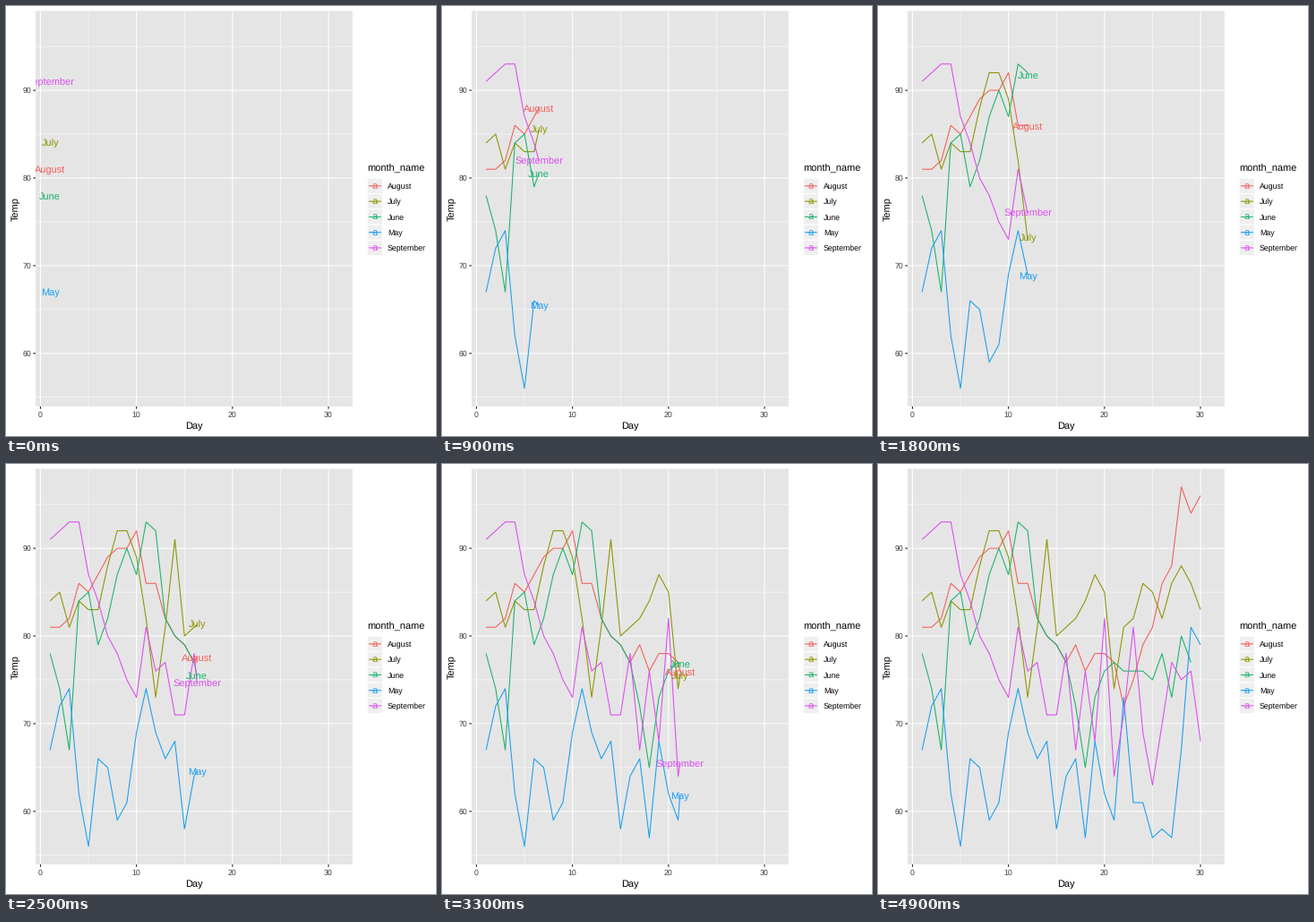
A matplotlib script for the animation above (5 s loop, 480 by 480 pixels).

```python
import matplotlib.pyplot as plt
from matplotlib.animation import FuncAnimation
from matplotlib.patches import Rectangle

SIZE, DPI = 480, 72
FRAMES, INTERVAL = 50, 100
LEFT, RIGHT, TOP, BOTTOM = 33.1, 386.8, 5.5, 447.0
X_MIN, X_MAX, Y_MIN, Y_MAX = -0.5, 32.5, 53.95, 99.05
LINE = 1.07

# Daily temperatures from the airquality data set
august = [81, 81, 82, 86, 85, 87, 89, 90, 90, 92, 86, 86, 82, 80, 79, 77,
          79, 76, 78, 78, 77, 72, 75, 79, 81, 86, 88, 97, 94, 96, 94]
july = [84, 85, 81, 84, 83, 83, 88, 92, 92, 89, 82, 73, 81, 91, 80, 81,
        82, 84, 87, 85, 74, 81, 82, 86, 85, 82, 86, 88, 86, 83, 81]
june = [78, 74, 67, 84, 85, 79, 82, 87, 90, 87, 93, 92, 82, 80, 79, 77,
        72, 65, 73, 76, 77, 76, 76, 76, 75, 78, 73, 80, 77, 83]
may = [67, 72, 74, 62, 56, 66, 65, 59, 61, 69, 74, 69, 66, 68, 58, 64,
       66, 57, 68, 62, 59, 73, 61, 61, 57, 58, 57, 67, 81, 79, 76]
september = [91, 92, 93, 93, 87, 84, 80, 78, 75, 73, 81, 76, 77, 71, 71, 78,
             67, 76, 68, 82, 64, 71, 81, 69, 63, 70, 77, 75, 76, 68]

NAMES = ["August", "July", "June", "May", "September"]
COLORS = ["#F35E5A", "#8E9400", "#19B56B", "#189FF2", "#DD4DF0"]
TEMPS = [august, july, june, may, september]

plt.rcParams.update({
    "font.family": "Liberation Sans",
    "text.hinting": "none",
    "toolbar": "None",
    "lines.solid_capstyle": "butt",
    "lines.solid_joinstyle": "round",
    "path.simplify": False,
})

fig = plt.figure(figsize=(SIZE / DPI, SIZE / DPI), dpi=DPI, facecolor="white")
ax = fig.add_axes([0, 0, 1, 1])
ax.set_xlim(0, SIZE)
ax.set_ylim(SIZE, 0)
ax.axis("off")


def px(day):
    return LEFT + (day - X_MIN) / (X_MAX - X_MIN) * (RIGHT - LEFT)


def py(temp):
    return BOTTOM - (temp - Y_MIN) / (Y_MAX - Y_MIN) * (BOTTOM - TOP)


def stroke(xs, ys, color, width=LINE, z=2):
    return ax.plot(xs, ys, color=color, lw=width, snap=False, zorder=z)[0]


def write(x, y, text, size, color="black", ha="left", z=5, **kw):
    """Text whose capitals are centred vertically on y."""
    return ax.text(x, y + 0.36 * size, text, fontsize=size, color=color,
                   ha=ha, va="baseline", zorder=z, **kw)


def box(x, y, w, h, fill, edge="none"):
    return ax.add_patch(Rectangle((x, y), w, h, fc=fill, ec=edge, lw=LINE,
                                  snap=False, zorder=1))


def draw_panel():
    panel = box(LEFT, TOP, RIGHT - LEFT, BOTTOM - TOP, "#E5E5E5")
    for day in range(0, 31, 5):
        major = day % 10 == 0
        stroke([px(day)] * 2, [TOP, BOTTOM], "white", LINE if major else LINE / 2)
        if major:
            stroke([px(day)] * 2, [BOTTOM, BOTTOM + 2.75], "#222222")
            write(px(day), 456, str(day), 8.8, "#3C3C3C", "center")
    for temp in range(55, 100, 5):
        major = temp % 10 == 0
        stroke([LEFT, RIGHT], [py(temp)] * 2, "white", LINE if major else LINE / 2)
        if major:
            stroke([LEFT - 2.75, LEFT], [py(temp)] * 2, "#222222")
            write(LEFT - 4.95, py(temp), str(temp), 8.8, "#3C3C3C", "right")
    write((LEFT + RIGHT) / 2, 468.1, "Day", 11, ha="center")
    ax.text(13.5, (TOP + BOTTOM) / 2, "Temp", fontsize=11, rotation=90,
            rotation_mode="anchor", ha="center", va="baseline")
    return panel


def draw_legend():
    x, y, key = 403.2, 192.2, 17.28
    write(x, 180.8, "month_name", 11)
    for i, (name, color) in enumerate(zip(NAMES, COLORS)):
        top = y + i * key
        mid = top + key / 2
        box(x, top, key, key, "#EFEFEF", "white")
        stroke([x + 0.1 * key, x + 0.9 * key], [mid, mid], color)
        write(x + key / 2, mid, "a", 11, color, "center")
        write(x + key + 5.5, mid, name, 8.8)


panel = draw_panel()
draw_legend()
paths = [stroke([], [], c, z=3) for c in COLORS]
labels = [write(0, 0, n, 11, c, "center", 4, clip_on=True)
          for n, c in zip(NAMES, COLORS)]
for artist in paths + labels:
    artist.set_clip_path(panel)


def update(frame):
    now = 1 + 30 * frame / (FRAMES - 1)
    for name, temps, path, label in zip(NAMES, TEMPS, paths, labels):
        running = now < len(temps)
        label.set_visible(running)
        if running:
            whole = int(now)
            a, b = temps[whole - 1:whole + 1]
            temp = a + (b - a) * (now - whole)
            days = list(range(1, whole + 1)) + [now]
            shown = temps[:whole] + [temp]
            label.set_position((px(now), py(temp) + 0.36 * 11))
        else:
            # A finished series loses its last day, except the final month
            shown = temps if name == "September" else temps[:-1]
            days = range(1, len(shown) + 1)
        path.set_data([px(d) for d in days], [py(t) for t in shown])
    return paths + labels


anim = FuncAnimation(fig, update, frames=FRAMES, interval=INTERVAL,
                     repeat=True, repeat_delay=0, blit=False)
plt.show()
```
